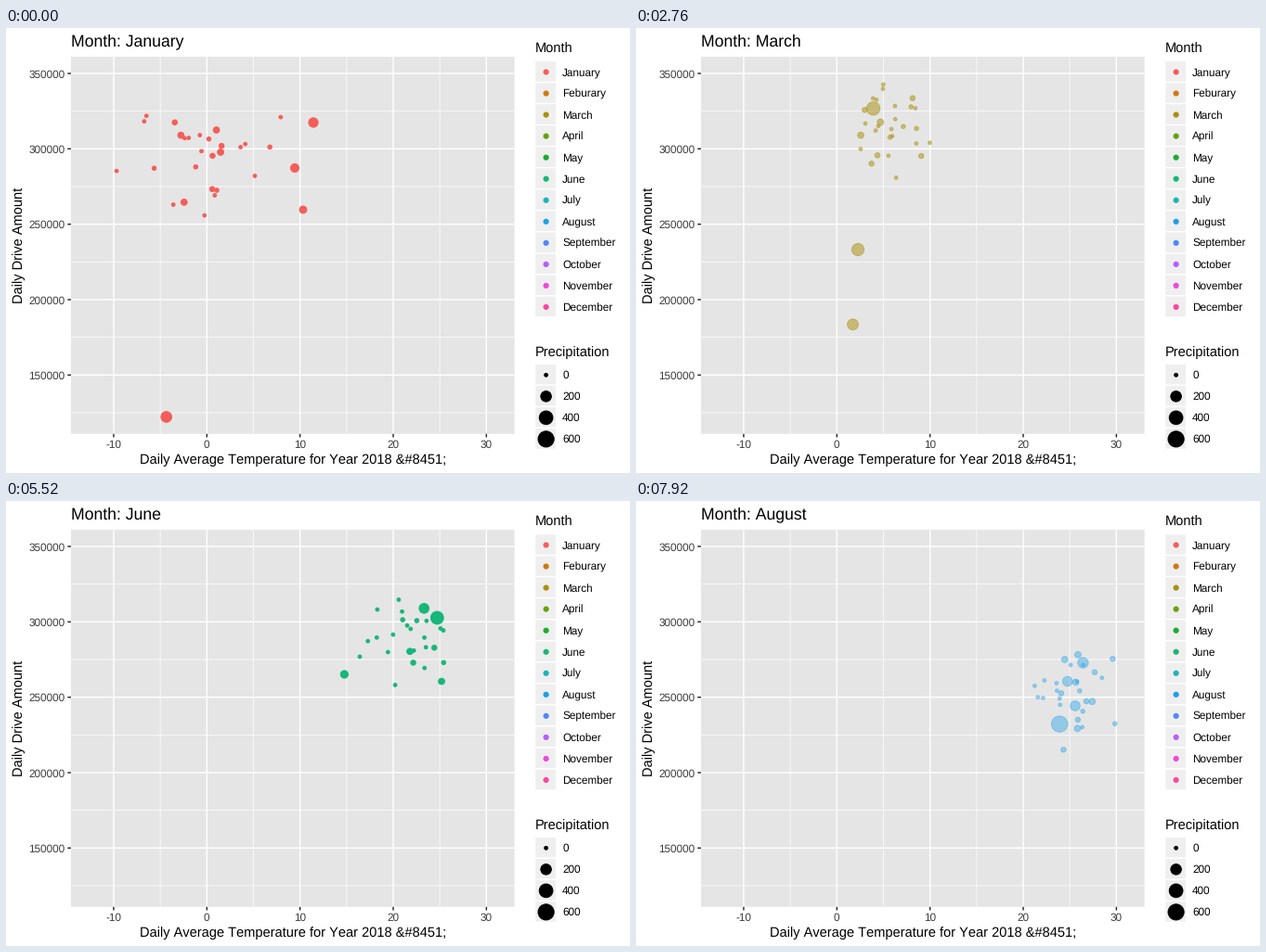
Animation of 672 by 480 pixels, one loop 8 s. Source, as a matplotlib script:

```python
import numpy as np
import matplotlib.pyplot as plt
from matplotlib.animation import FuncAnimation
from matplotlib.collections import LineCollection, PatchCollection
from matplotlib.patches import Circle, Rectangle

plt.rcParams["font.family"] = "Liberation Sans"
plt.rcParams["text.hinting"] = "none"
plt.rcParams["text.kerning_factor"] = 6      # plain advances, no kerning

W, H, DPI = 672, 480, 96
PX = 72 / DPI                  # points per pixel
LEFT, RIGHT, TOP, BOTTOM = 70, 547.6, 31, 437.8
STEP, TICK, LOOP = 120, 40, 8000
STROKE, MAX_RAIN = .945, 680

NAMES = ["January", "Feburary", "March", "April", "May", "June", "July",
         "August", "September", "October", "November", "December"]
COLORS = ["#f35e5a", "#d17711", "#a98f0b", "#68a10a", "#18ad2c", "#17b67a",
          "#1cb4b8", "#1c9fe8", "#4f87f9", "#b55ffb", "#ef47dd", "#fc479f"]

# Per month: days, low/typical/high x, low/typical/high y, wettest (x, y, rain)
MONTHS = [
    (31, (92, 215, 303), (73, 130, 233),
     [(331, 102, 141), (172.7, 419.5, 208), (311, 151, 94), (320, 196, 56)]),
    (28, (170, 285, 400), (60, 95, 220),
     [(336.3, 193, 253), (250.5, 186, 196), (247.5, 105, 178), (272, 180, 159)]),
    (31, (231, 242, 334), (49, 105, 177),
     [(255.5, 86.8, 383), (239, 239, 302), (233.5, 319.8, 219)]),
    (30, (254, 278, 400), (51, 88, 185),
     [(314.3, 161, 610), (350.2, 88.8, 219), (250.2, 197.2, 124)]),
    (31, (328, 420, 505), (74, 125, 225), [(430, 311, 94)]),
    (30, (378, 440, 498), (99, 130, 222),
     [(464.3, 126, 341), (450.2, 115.8, 159), (364.4, 187, 67)]),
    (31, (429, 460, 526), (146, 165, 300),
     [(478.2, 166, 490), (453.2, 265, 219), (451.8, 151, 150),
      (461.7, 247.5, 124)]),
    (31, (425, 478, 520), (147, 190, 285),
     [(456.2, 240.6, 628), (481.4, 174.5, 196), (464.7, 194.5, 155),
      (473, 221, 159)]),
]


def radius(rain):
    return dot_radius(1 + 5 * (rain / MAX_RAIN) ** .5)


def dot_radius(size):
    return (size * 2.845 + STROKE) / 2 + STROKE / 2


def month_dots(days, xs, ys, wet, seed):
    rng = np.random.default_rng(seed)
    n = days - len(wet)
    rain = rng.choice([0, 0, 0, 0, 2, 10, 30], n)
    mild = zip(rng.triangular(*xs, n), rng.triangular(*ys, n), rain)
    return [(x, y, radius(r)) for x, y, r in [*mild, *wet]]


def state(n):
    """Visible month, its opacity and the month in the title at step n."""
    start = 3
    for k in range(len(MONTHS)):
        span = 6 if k < 5 else 5
        if n < start + span - 1:
            j = max(0, n - start + 1)
            return k, 1 - j / span, k + (j > 3)
        start += span + 3


fig = plt.figure(figsize=(W / DPI, H / DPI), dpi=DPI, facecolor="white")
ax = fig.add_axes([0, 0, 1, 1])
ax.set_xlim(0, W)
ax.set_ylim(H, 0)
ax.axis("off")


def box(x0, y0, w, h, color, edge="none", lw=0):
    ax.add_patch(Rectangle((x0, y0), w, h, fc=color, ec=edge, lw=lw * PX,
                           snap=False))


def lines(segments, color, width):
    ax.add_collection(LineCollection(segments, colors=color, snap=False,
                                     linewidths=width * PX, capstyle="butt"))


def label(x, y, text, size, color="black", ha="left"):
    return ax.text(x, y, text, fontsize=size, color=color, ha=ha,
                   va="baseline")


def dots(points, color):
    circles = [Circle((x, y), r - STROKE / 2) for x, y, r in points]
    return ax.add_collection(PatchCollection(
        circles, facecolors=color, edgecolors=color, snap=False,
        linewidths=STROKE * PX, zorder=3))


def px_x(temp):
    return 216.3 + 10.035 * temp


def px_y(amount):
    return 49 + (350000 - amount) * 81.33 / 50000


# Panel, grid and axes
box(LEFT, TOP, RIGHT - LEFT, BOTTOM - TOP, "#e5e5e5")
x_ticks = range(-10, 31, 10)
y_ticks = range(150000, 350001, 50000)
for xs, ys, width in [(range(-5, 26, 10), range(125000, 325001, 50000), .71),
                      (x_ticks, y_ticks, 1.42)]:
    lines([[(px_x(t), TOP), (px_x(t), BOTTOM)] for t in xs]
          + [[(LEFT, px_y(a)), (RIGHT, px_y(a))] for a in ys], "white", width)
lines([[(px_x(t), BOTTOM), (px_x(t), BOTTOM + 3.7)] for t in x_ticks]
      + [[(LEFT - 3.7, px_y(a)), (LEFT, px_y(a))] for a in y_ticks],
      "#262626", 1.42)
for t in x_ticks:
    label(px_x(t), 453, str(t), 8.8, "#3d3d3d", "center")
for a in y_ticks:
    label(63.6, px_y(a) + 4.4, str(a), 8.8, "#3d3d3d", "right")
label((LEFT + RIGHT) / 2, 470, "Daily Average Temperature for Year 2018 &#8451;",
      11, ha="center")
ax.text(18, (TOP + BOTTOM) / 2, "Daily Drive Amount", fontsize=11, rotation=90,
        rotation_mode="anchor", ha="center", va="baseline")
title = label(LEFT, 19.5, "", 13.2)


# Legends
def legend(heading, y, names, colors, radii):
    label(569.3, y, heading, 11)
    for i, (name, color, r) in enumerate(zip(names, colors, radii)):
        cy = y + 20 + 23.04 * i
        box(569.6, cy - 11.5, 23.04, 23.04, "#efefef", "white", 1.42)
        dots([(581.1, cy, r)], color)
        label(599.2, cy + 4.3, name, 8.8)


amounts = range(0, 601, 200)
legend("Month", 27, NAMES, COLORS, [dot_radius(1.5)] * 12)
legend("Precipitation", 353.8, map(str, amounts), ["black"] * 4,
       map(radius, amounts))

clouds = [dots(month_dots(*month, seed), color)
          for seed, (month, color) in enumerate(zip(MONTHS, COLORS))]


def update(i):
    month, alpha, named = state(i * TICK // STEP)
    for k, cloud in enumerate(clouds):
        cloud.set_visible(k == month)
    clouds[month].set_alpha(alpha)
    title.set_text("Month: " + NAMES[named])
    return clouds + [title]


anim = FuncAnimation(fig, update, frames=LOOP // TICK, interval=TICK,
                     repeat=True, repeat_delay=0, blit=False)
plt.show()
```
